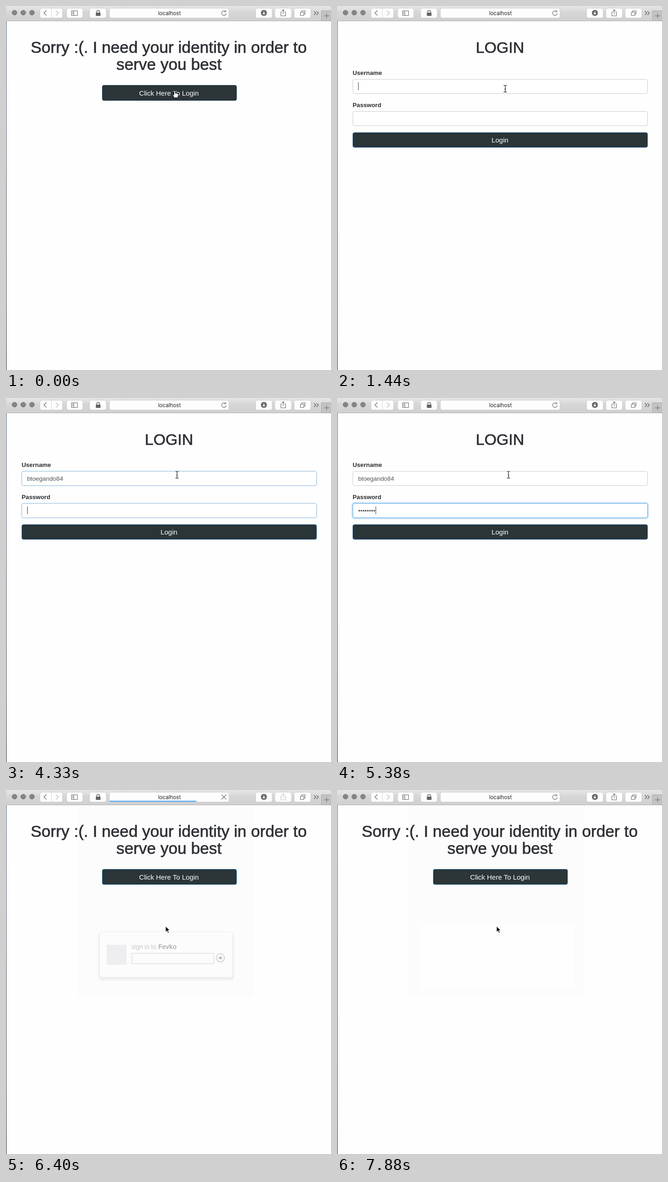
Recreate the animation shown at these times as an HTML page. Size 707 by 792 pixels, loop 8000 ms.

```html
<!DOCTYPE html>
<html lang="en">
<head>
<meta charset="utf-8">
<title>Login demo</title>
<style>
  html, body { margin: 0; width: 100%; height: 100%; overflow: hidden; background: #fefefe; }
  svg { display: block; font-family: "Liberation Sans", Arial, sans-serif; }
  .mid { text-anchor: middle; }
  .heading { fill: #2d3035; stroke: #2d3035; stroke-width: .7; }
  .label { font-weight: bold; font-size: 13.2px; fill: #2a2d30; }
  .typed { font-size: 13.4px; fill: #505355; }
  .button { font-size: 15px; fill: #fff; }
  .key { fill: #fdfdfd; stroke: #c2c2c2; stroke-width: .6; }
  .icon { fill: none; stroke: #6a6a6a; stroke-width: 1.1; }
  .glow { fill: none; stroke: #66afe9; filter: blur(1.8px); stroke-width: 4; }
</style>
</head>
<body>
<svg width="707" height="792" viewBox="0 0 707 792">
  <defs>
    <linearGradient id="bar" x2="0" y2="1">
      <stop stop-color="#e4e4e4"/><stop offset=".28" stop-color="#dedede"/>
      <stop offset=".32" stop-color="#d8d8d8"/><stop offset="1" stop-color="#cfcfcf"/>
    </linearGradient>
    <linearGradient id="edge" x2="0" y2="1">
      <stop stop-color="#41546a"/><stop offset=".8" stop-color="#2a3546"/><stop offset="1" stop-color="#0c0e14"/>
    </linearGradient>
    <clipPath id="addressClip"><rect x="225" y="5" width="260" height="21" rx="4"/></clipPath>
  </defs>
  <rect width="707" height="792" fill="#fefefe"/>

  <g id="landing">
    <g id="backdrop">
      <rect x="155" y="33" width="385" height="419" fill="#fcfcfc"/>
      <rect id="afterglow" x="180" y="295" width="336" height="138" fill="#fefefe"/>
    </g>
    <g class="heading mid" font-size="35.2">
      <text x="354" y="102">Sorry :(. I need your identity in order to</text>
      <text x="354.5" y="139">serve you best</text>
    </g>
    <rect id="startButton" x="209.5" y="172.5" width="292" height="33" rx="3.5"/>
    <text class="button mid" x="354.5" y="194.5">Click Here To Login</text>
    <g id="popup">
      <rect x="185" y="311" width="327" height="116" rx="10" fill="#dcdcdc" style="filter:blur(.8px)"/>
      <path d="M193.500 309.500H336L348 297L360 309.500H503a6 6 0 0 1 6 6V413.500a6 6 0 0 1 -6 6H193.500a6 6 0 0 1 -6 -6V315.500a6 6 0 0 1 6 -6Z" fill="#fcfcfc" stroke="#bcbcbc"/>
      <rect x="205" y="341" width="48" height="48" fill="#d6d8dc"/>
      <text x="265" y="351" font-size="14.2" font-weight="300" fill="#333" style="font-family:Inter,sans-serif">sign in to</text>
      <text x="329.500" y="351" font-size="15.3" font-weight="bold" fill="#2c2c34">Fevko</text>
      <rect x="265.500" y="361.500" width="198" height="25" fill="#fafafa" stroke="#7d7d7d"/>
      <circle cx="479" cy="372.500" r="9.800" fill="#fcfcfc" stroke="#484848" stroke-width="1.200"/>
      <path d="M474 370.800h4.500v-3l5.500 4.700l-5.500 4.700v-3h-4.500z" fill="#444"/>
    </g>
  </g>

  <g id="login">
    <text class="heading mid" x="354.500" y="101.500" font-size="33.800">LOGIN</text>
    <text class="label" x="34" y="150">Username</text>
    <text class="label" x="34" y="219.500">Password</text>
    <g id="userField"></g>
    <g id="passField"></g>
    <rect id="loginButton" x="34.500" y="275.500" width="641" height="32" rx="3.500"/>
    <text class="button mid" x="354.500" y="297">Login</text>
  </g>

  <rect y="33" width="1" height="759" fill="url(#edge)"/>
  <rect width="707" height="33" fill="url(#bar)"/>
  <path d="M0 32.500H707" stroke="#b0b0b0"/>
  <g fill="#858585" stroke="#707070">
    <circle cx="18.500" cy="14.500" r="5.300"/><circle cx="37.500" cy="14.500" r="5.300"/><circle cx="56.500" cy="14.500" r="5.300"/>
  </g>
  <g id="keys"></g>
  <path d="M98.500 5V26" stroke="#d4d4d4"/>
  <g class="icon">
    <path d="M88 10l-5.500 5.300l5.500 5.300" stroke-width="1.300"/>
    <path d="M108.500 10l5.500 5.300l-5.500 5.300" stroke="#bbb" stroke-width="1.300"/>
    <path d="M142.500 10.500h13v10h-13zM147.500 10.500v10M144 13h2M144 15h2M144 17h2"/>
    <path d="M197.500 15v-2.500a3 3 0 0 1 6 0v2.500" stroke-width="1.600"/>
    <rect x="196" y="15" width="9" height="6" fill="#5d5d5d"/>
    <circle cx="561" cy="15" r="6" fill="#666"/>
    <path d="M561 11.500v6M558.300 15.200l2.700 2.800l2.700 -2.800" stroke="#fff" stroke-width="1.400"/>
    <path id="share" d="M600.500 13h-2.500v8.500h10v-8.500h-2.500M603 17.500v-9M600.500 10.500l2.500 -2.500l2.500 2.500"/>
    <path d="M640.500 13.500h7.500v7h-7.500zM643 13.500v-3h7.500v7h-2.500"/>
    <path d="M670 11.500l4 4l-4 4M675.500 11.500l4 4l-4 4" stroke="#555"/>
    <path id="reload" d="M477.500 12a5 5 0 1 0 1.500 3.500M474.500 12.500h3.500v-3.500"/>
    <path id="stop" d="M469 10.500l10 10M479 10.500l-10 10"/>
  </g>
  <text class="mid" x="355.500" y="19.500" font-size="11.600" fill="#222" style="font-family:Inter,sans-serif">localhost</text>
  <g clip-path="url(#addressClip)"><rect id="progress" x="225" y="23.500" height="2" fill="#3d97f3"/></g>
  <path d="M686.500 32.500V10.500H707V32.500z" fill="#c3c3c3" stroke="#a6a6a6"/>
  <path d="M692 21.500h11M697.500 16v11" stroke="#666"/>

  <g id="cursor">
    <path id="arrow" d="M0 0V13.500L3.200 10.600L5.400 15.600L7.700 14.600L5.500 9.800H9.800Z" stroke="#fff" stroke-width="1.100"/>
    <path id="beam" d="M-3.500 -7.500q3 0 3.500 1.500q.5 -1.500 3.500 -1.500M0 -6V6M-3.500 7.500q3 0 3.500 -1.500q.5 1.500 3.500 1.500M-1.500 1h3" fill="none" stroke="#222" stroke-width="1.200"/>
    <path id="hand" d="M-1.500 1.200q1.500 -2 3 0V6l1.500 -.5l1 1l1.500 -.3l.8 1l1.600 .3V11l-1.500 4.500H-.8L-4.600 9.500q.3 -1.800 3.100 .3Z" fill="#fff" stroke="#111"/>
  </g>
</svg>
<script>
const LOOP = 8000;
const USER = "btoegando84", PASS = "•".repeat(9);
const USER_KEYS = [2290, 2400, 2510, 2620, 2740, 2850, 2950, 3040, 3150, 3270, 3400];
const PASS_KEYS = Array.from(PASS, (_, i) => 5090 + i * 38);
// time, x, y of the pointer hot spot
const PATH = [
  [0, 367, 184], [600, 367, 184], [620, 365, 184], [1400, 366, 180], [2230, 360, 172],
  [2600, 355, 172], [3100, 355, 172], [3630, 370, 167], [3970, 372, 167], [4790, 372, 167],
  [4850, 373, 167], [5380, 373, 167], [5700, 347, 296]
];

const $ = id => document.getElementById(id);
const set = (el, attrs) => { for (const k in attrs) el.setAttribute(k, attrs[k]); };
const show = (id, on) => { $(id).style.display = on ? "" : "none"; };
const ramp = (t, a, b) => {
  const p = Math.min(1, Math.max(0, (t - a) / (b - a)));
  return p * p * (3 - 2 * p);
};
const between = (t, a, b) => t >= a && t < b;

$("keys").innerHTML = [[74, 49], [132, 35], [182, 36], [225, 260], [543, 36], [585, 36], [627, 36]]
  .map(([x, w]) => `<rect class="key" x="${x}" y="5" width="${w}" height="21" rx="4"/>`).join("");

function makeField(id, top) {
  const box = `x="34.5" y="${top + .5}" width="641" height="31" rx="3.5"`;
  $(id).innerHTML = `<rect class="glow" ${box}/><rect ${box} fill="#fff"/>
    <text class="typed" x="46" y="${top + 20.5}"></text>
    <path stroke="#333" d="M.5 ${top + 7}v17"/>`;
  const [glow, frame, text, caret] = $(id).children;
  return (t, value, keys, focusAt, blurAt) => {
    const focus = ramp(t, focusAt, focusAt + 120) - ramp(t, blurAt, blurAt + 120);
    const mix = (a, b) => Math.round(a + (b - a) * focus);
    set(glow, { opacity: focus * focus * .6 });
    set(frame, { stroke: `rgb(${mix(204, 102)},${mix(204, 175)},${mix(204, 233)})` });
    const pressed = keys.filter(k => k <= t);
    text.textContent = value.slice(0, pressed.length);
    const lastInput = pressed.length ? pressed[pressed.length - 1] : focusAt;
    const lit = between(t, focusAt, blurAt) && (t - lastInput) % 920 < 520;
    const end = pressed.length ? text.getComputedTextLength() : 0;
    set(caret, { opacity: lit ? 1 : 0, transform: `translate(${46 + Math.round(end)} 0)` });
  };
}
const drawUser = makeField("userField", 159);
const drawPass = makeField("passField", 229);

function drawCursor(t, onLogin) {
  let i = 0;
  while (i < PATH.length - 2 && PATH[i + 1][0] <= t) i++;
  const [t0, x0, y0] = PATH[i], [t1, x1, y1] = PATH[i + 1];
  const p = ramp(t, t0, t1);
  const x = x0 + (x1 - x0) * p, y = y0 + (y1 - y0) * p;
  let kind = "arrow";
  if (t < 620 || (onLogin && y > 275 && t < 6080)) kind = "hand";
  else if (onLogin && t > 690 && (between(y, 159, 191) || between(y, 229, 261))) kind = "beam";
  for (const k of ["arrow", "beam", "hand"]) show(k, k === kind);
  set($("cursor"), { transform: `translate(${x} ${y})` });
}

function drawProgress(t) {
  const loading = between(t, 600, 1080) || between(t, 6080, 6500);
  show("stop", loading);
  show("reload", !loading);
  set($("share"), { stroke: loading ? "#c4c4c4" : "#6a6a6a" });
  let width = 0, opacity = 0;
  if (between(t, 600, 1380)) {
    width = 13 + 247 * ramp(t, 640, 1080);
    opacity = .75 + .25 * ramp(t, 620, 700) - ramp(t, 1130, 1380);
  } else if (between(t, 6220, 6870)) {
    width = 13 + 247 * ramp(t, 6220, 6500);
    opacity = 1 - ramp(t, 6600, 6890);
  }
  set($("progress"), { width, opacity: Math.max(0, opacity) });
}

function draw(t) {
  const onLogin = between(t, 620, 6300);
  show("login", onLogin);
  show("landing", !onLogin);
  show("backdrop", t >= 6300);
  show("afterglow", t >= 7880);
  show("popup", between(t, 6340, 7880));
  const grow = ramp(t, 6320, 6520), scale = .85 + .15 * grow;
  set($("popup"), { opacity: grow, transform: `translate(348 297) scale(${scale}) translate(-348 -297)` });
  set($("startButton"), {
    fill: between(t, 470, 620) ? "#262f32" : "#2c3537",
    stroke: t < 470 ? "#23404f" : t < 620 ? "#1d2529" : "#1f6796"
  });
  set($("loginButton"), { fill: "#2a3538", stroke: t < 5640 ? "#205a8c" : "#202c33" });
  drawUser(t, USER, USER_KEYS, 1440, 4270);
  drawPass(t, PASS, PASS_KEYS, 4270, 6090);
  drawProgress(t);
  drawCursor(t, onLogin);
}

function frame() {
  draw(performance.now() % LOOP);
  requestAnimationFrame(frame);
}
frame();
</script>
</body>
</html>
```
